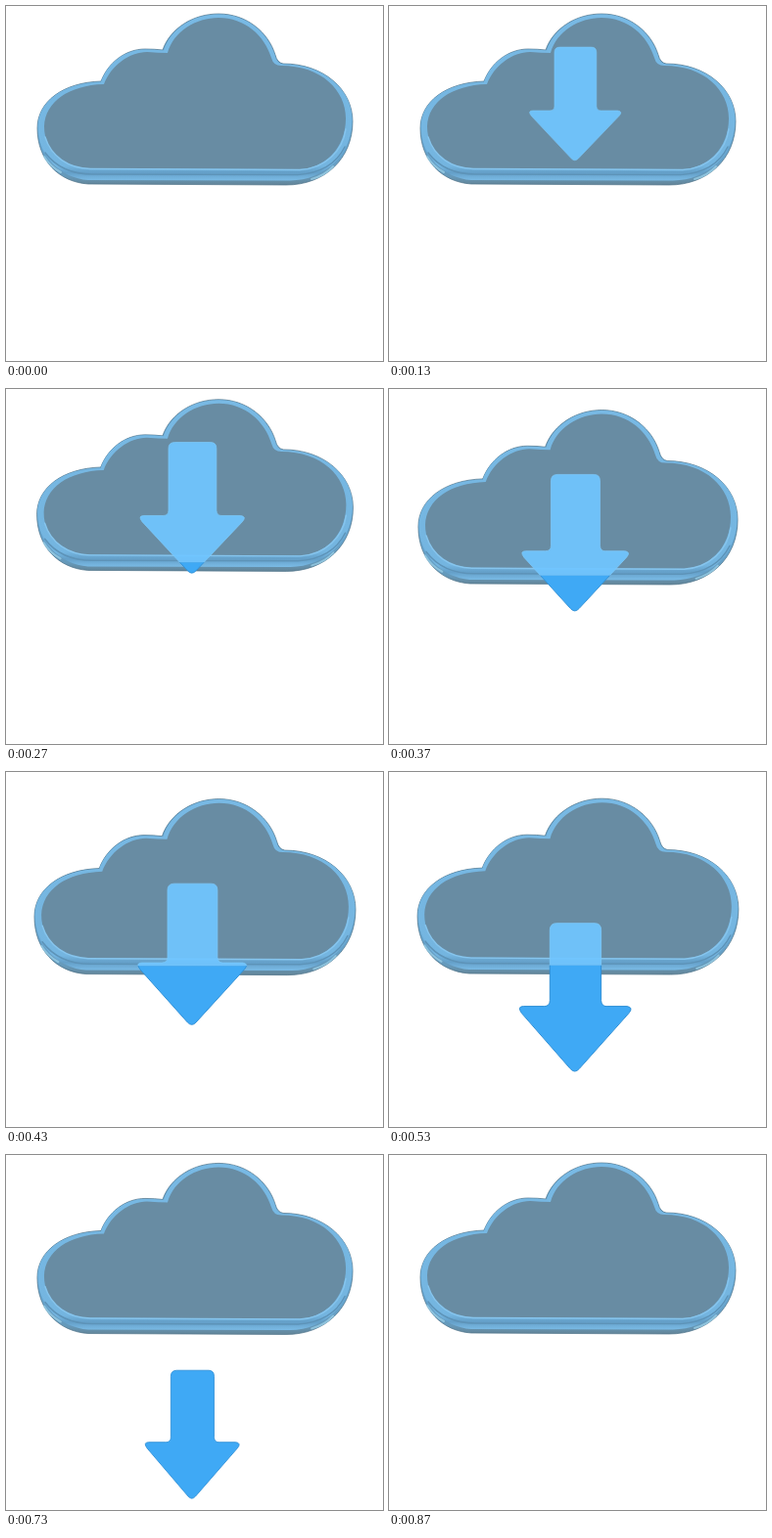
An HTML page without scripts that plays this animation: 385 by 363 pixels, repeating every 1.2 s.

```html
<!DOCTYPE html>
<html lang="en">
<head>
<meta charset="utf-8">
<title>Cloud download</title>
<style>
  /* tick counter: 36 ticks per loop, every pose is a formula of --n */
  @property --n { syntax: "<number>"; inherits: true; initial-value: 0; }
  @keyframes tick { from { --n: 0; } to { --n: 36; } }

  html, body { margin: 0; width: 100%; height: 100%; overflow: hidden; background: #fff; }
  body { animation: tick 1.2s steps(36) -4ms infinite; }

  .stage {
    position: relative; width: 385px; height: 363px;
    /* cloud dip, 0 to 1 */
    --dip: pow(cos(clamp(-1.5708, (var(--n) - 14.4) * .188, 1.5708)), 2);
    /* arrow travel, -1 to 1 */
    --go: sin(clamp(-1.5708, (var(--n) - 13.5) * .16, 1.5708));
    --size: max(0, 1 - pow(max(0, 1 - var(--n) / 6), 2) - pow(max(0, (var(--n) - 19) / 7), 2));
    --edge: calc(174px + 26px * var(--dip));
  }
  .stage svg { position: absolute; left: 0; top: 0; width: 385px; height: 363px; }

  .cloud {
    transform: translate(193px, calc(8px + 21px * var(--dip)))
               scale(calc(1 + .02 * var(--dip)), calc(1 + .031 * var(--dip)))
               translate(-193px, -8px);
  }
  .arrow {
    transform: translate(190.2px, calc(194px + 94px * var(--go)))
               scale(calc(var(--size) * (.974 + .056 * var(--go))),
                     calc(var(--size) * (.96 + .101 * var(--go))));
  }
  .shade { opacity: clamp(0, 1 - max(var(--n) - 19, 19 - var(--n)) / 3, 1); }
  .inside { clip-path: inset(0 0 calc(363px - var(--edge)) 0); }
  .outside { clip-path: inset(var(--edge) 0 0 0); }
</style>
</head>
<body>
<div class="stage">
  <svg viewBox="0 0 385 363">
    <defs>
      <linearGradient id="side" x1="0" y1="0" x2="0" y2="1">
        <stop offset=".8" stop-color="#68a6d0"/>
        <stop offset=".95" stop-color="#6599ba"/>
        <stop offset="1" stop-color="#648598"/>
      </linearGradient>
      <linearGradient id="rim" gradientUnits="userSpaceOnUse" x1="0" y1="8" x2="0" y2="179">
        <stop offset="0" stop-color="#78b9e4"/>
        <stop offset=".91" stop-color="#74b5e0"/>
        <stop offset=".95" stop-color="#649fc8"/>
        <stop offset="1" stop-color="#7cbde8"/>
      </linearGradient>
      <path id="shape" d="M-19-76H20Q26.5-76 26.5-69V3Q27 9 32 9H53Q60 10 55 16L4 73Q-.5 78-5 73L-55 16Q-60 9-53 9H-32Q-26 9-26 3V-69Q-26-76-19-76Z"/>
    </defs>
    <g class="cloud" fill="none" stroke-linecap="round">
      <path fill="url(#side)" stroke="#4c7289" stroke-width=".7" d="M97 77C104 58 122 44 142 44Q152 44 160 45C168 22 192 8 217 8C246 8 268 27 275 50Q277 58 283 59C324 59 354 85 354 118C354 156 326 183 286 183L84 182C54 180 32 158 32 125C32 98 58 78 97 77Z"/>
      <path fill="url(#rim)" d="M97 77.500C104 58 122 44.500 142 44.500Q152 44.500 161 45.500C169 22 192 8.500 217 8.500C246 8.500 267 27 274.500 50Q276 59 283 59.500C324 59.500 353.500 85 353.500 116C353 152 326 178 290 178.500L84 178C56 176 33 154 32.500 123C33 98 58 78.500 97 77.500Z"/>
      <path fill="#688ca3" d="M100 80C107 61 126 47 144 47Q156 48 165 48C171 26 194 12 217 12C244 12 264 30 271 53Q273 61 281 61C322 61 347 86 347 115C347 146 325 166 300 167L85 166C60 165 39 150 39 123C40 98 64 81 100 80Z"/>
      <path stroke="#86c5ee" stroke-width="1.400" d="M40 134C46 154 64 166 86 166.500L300 167.500C326 166 344 148 347 126"/>
      <path stroke="#5d93b8" stroke-width="1.500" d="M40 150C52 166 68 172 88 172L298 172.500C322 171 338 160 346 144"/>
      <path stroke="#9bd0e8" stroke-width="2" opacity=".75" d="M39 154Q45 164 56 170M312 177Q326 173 334 164"/>
      <path class="shade" stroke="#587f99" stroke-width="4" d="M153 174Q180 177 206 176"/>
    </g>
  </svg>
  <svg class="inside" viewBox="0 0 385 363">
    <use class="arrow" href="#shape" fill="#70c5ff" fill-opacity=".93" stroke="#7cc9fa" stroke-width=".8"/>
  </svg>
  <svg class="outside" viewBox="0 0 385 363">
    <use class="arrow" href="#shape" fill="#3fa9f5" stroke="#3190d6" stroke-width="1"/>
  </svg>
</div>
</body>
</html>
```
